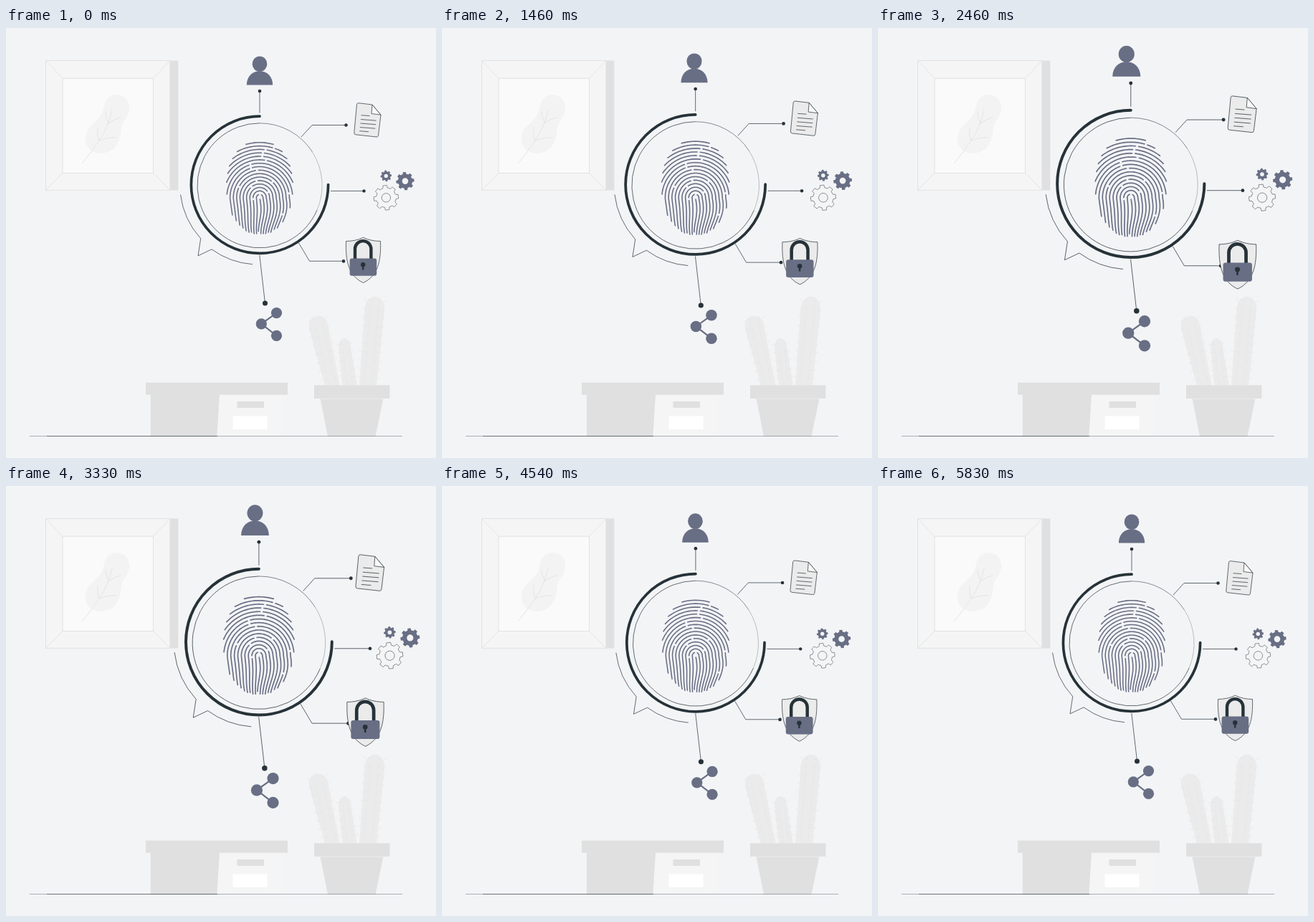
Recreate the animation shown at these times as an HTML page. Size 600x600 px, loop 5.87 s.

```html
<!DOCTYPE html>
<html lang="en">
<head>
<meta charset="utf-8">
<title>Biometric access</title>
<style>
  html, body { margin: 0; width: 100%; height: 100%; overflow: hidden; background: #f3f4f6; }
  svg { display: block; width: 100vw; height: 100vh; }
  .ink { fill: none; stroke: #263238; stroke-width: .7; stroke-linejoin: round; }
  .soft { fill: none; stroke: #e2e2e2; stroke-width: .9; stroke-linecap: round; }
  .dark { fill: #263238; }
  .slate { fill: #686e84; }
  .grey { fill: #e0e0e0; }
  .pale { fill: #ebebeb; }
</style>
</head>
<body>
<svg viewBox="0 0 600 600">
  <g id="room">
    <!-- wall picture -->
    <path class="grey" d="M228 45.500H240.300V226.500H228Z"/>
    <path d="M55.500 45.500H229V226.300H55.500Z" fill="#f5f5f5" stroke="#e0e0e0" stroke-width=".9"/>
    <path d="M79 70.200H205.500V202.500H79Z" fill="#fafafa" stroke="#e0e0e0" stroke-width=".9"/>
    <path class="soft" d="M55.500 45.500L79 70.200M229 45.500L205.500 70.200M55.500 226.300L79 202.500M229 226.300L205.500 202.500"/>
    <path fill="#f3f3f4" d="M137 108C140 88 170 88 172 109C173 124 163 128 161 138C160 155 155 175 131 175C112 174 106 155 115 141C125 129 134 126 137 108Z"/>
    <path class="soft" d="M106.500 188.500Q120 172 130 157Q142 140 148 115M130 157Q127 150 128 139M130 157Q144 152 154 153M144 133Q139 126 139 117M144.500 132Q152 126 160 125"/>

    <!-- box -->
    <path fill="#f5f5f5" d="M290 511H385V570H290Z"/>
    <path class="grey" d="M195 494.700H393V511.800H298L294.300 570H201.800V511.800H195ZM322.500 521H360V530H322.500Z"/>
    <path fill="#fff" d="M316.500 541.500H364.500V560H316.500Z"/>

    <!-- cacti -->
    <path class="pale" d="M445 500L423.500 421C418 400 443 395 448.500 411L466 500ZM470 500L464 447C463 429 479 429 481 443L490 500ZM493 500L500.500 391C502 369 529 369 528 393L517 500Z"/>
    <g id="spines" class="soft" opacity=".75"></g>
    <path class="grey" d="M430 498.600H535.500V517H526.500L515.500 570H449L438.500 517H430Z"/>
    <path d="M438.500 517.300H526.500" stroke="#ebebeb"/>

    <!-- floor -->
    <path d="M33 569.600H553" stroke="#263238" stroke-width=".6" opacity=".65"/>
    <path d="M57 569.600H295" stroke="#263238" stroke-width=".7" opacity=".75"/>
  </g>

  <g id="scanner">
    <path d="M354 123.200A95.600 95.600 0 1 0 449.600 218.500" fill="none" stroke="#263238" stroke-width="3.700" stroke-linecap="round"/>
    <path class="ink" d="M354 132.800A87 87 0 1 0 434 254"/>
    <path class="ink" opacity=".75" d="M354 132.800A87 87 0 0 1 427.500 173"/>
    <path class="ink" opacity=".4" d="M427.500 173A87 87 0 0 1 434 254"/>
    <path class="ink" d="M243.500 232.500A111.500 111.500 0 0 0 271.700 293.700L268 317.800L287 308.800A111.500 111.500 0 0 0 344 329.700"/>
    <path class="ink" d="M354 88V118.500M474.500 135.500H427L412 152M499.500 227.400H453M471 325.300H423.500L408.500 300M361.500 384L353.800 317"/>
    <g id="dots" class="dark"></g>
    <g id="print" fill="none" stroke="#686e84" stroke-width="1.550" stroke-linecap="round" stroke-linejoin="round"></g>
  </g>

  <g id="icons">
    <!-- person -->
    <ellipse class="slate" cx="354" cy="50.200" rx="10.300" ry="10.800"/>
    <path class="slate" d="M335.800 79.500C336 67 344 60.300 354 60.300S372 67 372.200 79.500Z"/>

    <!-- document -->
    <path class="ink" style="fill:#ebebeb" d="M492 104.700L511 107L523 121.200L519.500 150Q519 152.300 517 152L488 148.800Q485.500 148.500 485.800 146L489.500 106.500Q490 104.500 492 104.700Z"/>
    <path class="ink" style="fill:#fafafa" d="M511 107L510 119.500L523 121.200Z"/>
    <path class="ink" d="M495.500 121.700L507.500 122.600M495 127.500L516.500 129.200M494.500 133L516 134.700M493.800 138.500L515.300 140.200M493.200 143.700L506 144.700"/>

    <g id="gears"></g>

    <!-- shield and padlock -->
    <path class="ink" style="fill:#ebebeb" d="M498.500 292.300C491 296 482.500 297.500 474.500 297.500C473.500 325 478 346 498.500 355.500C519 346 523.500 325 522.500 297.500C514.500 297.500 506 296 498.500 292.300Z"/>
    <path d="M487 323V308.300A11.200 11.200 0 0 1 509.400 308.300V323" fill="none" stroke="#263238" stroke-width="4.400"/>
    <rect class="slate" x="479.600" y="321.500" width="37.600" height="24.300" rx="3"/>
    <circle class="dark" cx="498.200" cy="330.300" r="3.200"/>
    <path class="dark" d="M497 331H499.400V337.500H497Z"/>

    <!-- share -->
    <path d="M377.500 397.600L356.300 412.900L377.500 429.300" fill="none" stroke="#686e84" stroke-width="2.100"/>
    <g id="nodes" class="slate"></g>
  </g>
</svg>

<script>
const $ = id => document.getElementById(id);

function add(parent, tag, attrs) {
  const el = document.createElementNS('http://www.w3.org/2000/svg', tag);
  for (const name in attrs) el.setAttribute(name, attrs[name]);
  return $(parent).appendChild(el);
}

const circle = (parent, cx, cy, r) => add(parent, 'circle', { cx, cy, r });
const toPath = pts => 'M' + pts.map(p => p.map(v => v.toFixed(2)).join(' ')).join('L');

function random(seed) {
  return () => (seed = (seed * 16807) % 2147483647) / 2147483647;
}

// Ribs with short spines, running from the base (x0, y0) to the tip (x1, y1).
function cactus(x0, y0, x1, y1, halfWidth) {
  const length = Math.hypot(x1 - x0, y1 - y0);
  const ux = (x1 - x0) / length, uy = (y1 - y0) / length;
  const at = (along, side) => [x0 + ux * along - uy * side, y0 + uy * along + ux * side];
  for (const rib of [-.95, -.4, .4, .95]) {
    const side = rib * halfWidth;
    if (Math.abs(rib) < .9) {
      add('spines', 'path', { d: toPath([at(0, side), at(length - 10, side)]), opacity: .5 });
    }
    for (let s = 8; s < length - 2; s += 12) {
      add('spines', 'path', { d: toPath([at(s, side), at(s + 2, side + Math.sign(rib) * 3)]) });
    }
  }
}

function gear(cx, cy, r, hole, attrs) {
  const teeth = 8, pts = [];
  for (let i = 0; i < teeth; i++) {
    for (const [offset, radius] of [[-.3, .8], [-.2, 1], [.2, 1], [.3, .8]]) {
      const a = (i + offset) / teeth * 2 * Math.PI - .1;
      pts.push([cx + Math.cos(a) * r * radius, cy + Math.sin(a) * r * radius]);
    }
  }
  const ring = `M${cx - hole} ${cy}a${hole} ${hole} 0 1 0 ${2 * hole} 0a${hole} ${hole} 0 1 0 ${-2 * hole} 0Z`;
  add('gears', 'path', { d: toPath(pts) + 'Z' + ring, 'fill-rule': 'evenodd', ...attrs });
}

// Nested arches with swaying legs, trimmed to an egg that is fuller at the top.
function fingerprint() {
  const cx = 354, cy = 237, middle = 223.5, next = random(77);
  const inside = ([x, y]) => {
    const power = y < middle ? 2.3 : 2.05;
    return (Math.abs(x - cx) / 46.5) ** power + (Math.abs(y - middle) / 65) ** power < 1;
  };
  const leg = (side, a, y) => {
    const v = (y - cy) / 51;
    return [cx + side * a * (1 - .28 * v * v) + (side > 0 ? 1.8 : 1) * Math.sin(v * 5), y];
  };
  for (let k = 0; k < 17; k++) {
    const a = 4.6 * k, pts = [];
    if (k) {
      for (let y = 289; y > cy; y -= 2) pts.push(leg(-1, a, y));
      for (let i = 0; i <= 60; i++) {
        const t = Math.PI * i / 60;
        pts.push([cx - a * Math.cos(t), cy - 4.83 * k * Math.sin(t)]);
      }
    }
    for (let y = cy + 2; y < 289; y += 2) pts.push(leg(1, a, y));

    let run = [];
    for (const p of [...pts, [0, 0]]) {
      if (inside(p)) { run.push(p); continue; }
      if (run.length > 2) {
        const dash = [45 + 60 * next(), 4, 60 + 60 * next(), 4];
        add('print', 'path', { d: toPath(run), 'stroke-dasharray': dash.join(' ') });
      }
      run = [];
    }
  }
}

cactus(455, 497, 435, 404, 12);
cactus(480, 497, 472, 436, 9);
cactus(505, 497, 515, 378, 13);

circle('dots', 354, 88, 2.3);
circle('dots', 474.5, 135.5, 2.3);
circle('dots', 499.5, 227.4, 2.2);
circle('dots', 471, 325.4, 2.3);
circle('dots', 361.5, 384, 3.5);

circle('nodes', 377.5, 397.6, 7.6);
circle('nodes', 356.3, 412.9, 7.6);
circle('nodes', 377.5, 429.3, 7.6);

gear(530.3, 206.4, 7.8, 2.7, { class: 'slate' });
gear(557, 213.6, 12.7, 4.3, { class: 'slate' });
gear(530.4, 236.8, 17.3, 6.2, { class: 'ink', style: 'fill:#f5f5f5;stroke-width:.5' });
fingerprint();

const LOOP = 5870, FRAMES = 141, BEAT = 70, PEAK = 1.103;
const stops = [[0, 1], [.2, PEAK], [.6, 1], [.8, PEAK], [1, 1]];

function beatScale(phase) {
  const i = stops.findIndex(stop => phase < stop[0]);
  const [p0, s0] = stops[i - 1], [p1, s1] = stops[i];
  return s0 + (s1 - s0) * (phase - p0) / (p1 - p0);
}

// The artwork is drawn at the size it has when the loop starts.
const BASE = beatScale(.5 / BEAT);

function zoom(id, x, y, s) {
  $(id).setAttribute('transform', `translate(${x} ${y}) scale(${s}) translate(${-x} ${-y})`);
}

function render(ms) {
  const frame = Math.floor((ms % LOOP) / LOOP * FRAMES + .001);
  const s = beatScale((frame + .5) % BEAT / BEAT) / BASE;
  zoom('scanner', 371, 237, s);
  zoom('icons', 453, 238.5, s);
}

let start;
function tick(now) {
  start ??= now;
  render(now - start);
  requestAnimationFrame(tick);
}
render(0);
requestAnimationFrame(tick);
</script>
</body>
</html>
```
